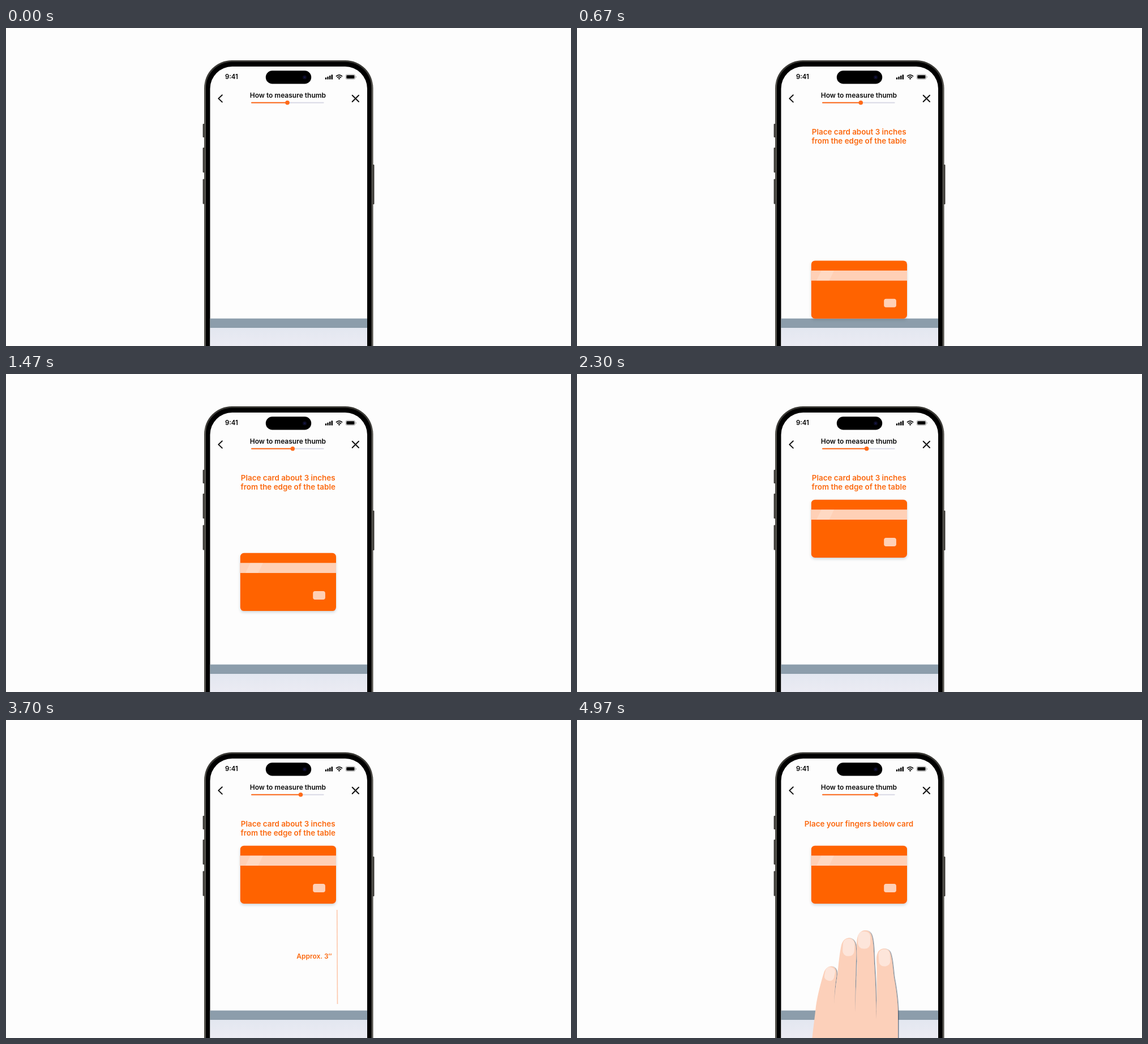
These frames come from a looping animation (998 by 561 pixels, 5 s). An HTML page:

```html
<!DOCTYPE html>
<html lang="en">
<head>
<meta charset="utf-8">
<title>How to measure thumb</title>
<style>
  html, body { margin: 0; width: 100%; height: 100%; overflow: hidden; background: #fdfdfd; }
  svg { display: block; width: 100vw; height: 100vh; }
  text { font-family: Poppins, Inter, sans-serif; font-weight: 600; }
  .accent { fill: #fb6910; text-anchor: middle; font-size: 13.4px; }
</style>
</head>
<body>
<svg viewBox="0 0 998 561">
  <defs>
    <linearGradient id="metal" x1="0" x2="1" y1="0" y2="0">
      <stop offset="0" stop-color="#35342f"/>
      <stop offset=".006" stop-color="#65635d"/>
      <stop offset=".012" stop-color="#3b3a36"/>
      <stop offset=".988" stop-color="#3b3a36"/>
      <stop offset=".994" stop-color="#65635d"/>
      <stop offset="1" stop-color="#35342f"/>
    </linearGradient>
    <linearGradient id="tableSide" x1="0" x2="0" y1="0" y2="1">
      <stop offset="0" stop-color="#e3e7f0"/>
      <stop offset="1" stop-color="#ebebf3"/>
    </linearGradient>
    <clipPath id="screenClip">
      <path d="M360.5 561V107A39 39 0 0 1 399.5 68H599A39 39 0 0 1 638 107V561Z"/>
    </clipPath>
    <filter id="cardShadow" x="-10%" y="-10%" width="120%" height="130%">
      <feDropShadow dx="0" dy="2.5" stdDeviation="2.2" flood-color="#34465a" flood-opacity=".22"/>
    </filter>
    <filter id="handShadow" x="-10%" y="-10%" width="120%" height="120%">
      <feDropShadow dx="1.5" dy=".6" stdDeviation=".6" flood-color="#34465a" flood-opacity=".65"/>
    </filter>
  </defs>

  <rect width="998" height="561" fill="#fdfdfd"/>

  <!-- Phone body -->
  <g fill="#3f3d39">
    <rect x="347.6" y="169" width="4" height="24" rx="1"/>
    <rect x="347.6" y="211" width="4" height="44" rx="1"/>
    <rect x="347.6" y="266.500" width="4" height="44" rx="1"/>
    <rect x="646.500" y="241" width="4" height="70" rx="1"/>
  </g>
  <rect x="350" y="57" width="298.500" height="600" rx="49" fill="url(#metal)"/>
  <rect x="353" y="59.8" width="292.500" height="600" rx="46" fill="#000"/>

  <g clip-path="url(#screenClip)">
    <rect x="360" y="67" width="279" height="494" fill="#fdfdfd"/>
    <rect x="360" y="529" width="279" height="32" fill="url(#tableSide)"/>
    <rect x="360" y="512.500" width="279" height="16.500" fill="#8c9dab"/>

    <g id="placeCard" class="accent">
      <text x="498.2" y="188">Place card about 3 inches</text>
      <text x="498.2" y="203.500">from the edge of the table</text>
    </g>
    <text id="placeFingers" class="accent" x="498" y="188">Place your fingers below card</text>

    <g id="card">
      <g filter="url(#cardShadow)">
        <rect x="413.800" width="169.200" height="102.300" rx="6.500" fill="#ff6400"/>
      </g>
      <rect x="413.800" y="17.500" width="169.200" height="17.800" fill="#ffd0b6"/>
      <path d="M431.500 17.500H454L445.500 35.300H423Z" fill="#fff" opacity=".18"/>
      <rect x="542.200" y="67.300" width="21.700" height="15" rx="3.800" fill="#ffd0b6"/>
    </g>

    <line id="ruler" x1="584.700" y1="335" stroke="#fdc7ab" stroke-width="1.600"/>
    <text id="distance" class="accent" x="544.500" y="421" style="font-size:12px">Approx. 3″</text>

    <g id="hand">
      <path filter="url(#handShadow)" fill="#fcd0ba" d="M414 575C417 545 420 525 422 505C425 485 431 462 436 446
        C440 433 453 431 457 440C460 446 458 455 456.500 465C455 480 454 495 454 508
        C454 490 457 470 460 450C462 430 464 410 467 397C471 382 485 381 490 391
        C495 400 493 420 492.500 440C492 465 491 490 491.500 515
        C492 480 494.500 450 495 425C494.500 410 493 395 495 385C498 368 516 367 520 379
        C524 390 524 410 525 430C527 460 528 490 529 528
        C529 490 530 460 529.500 435C529 425 528 417 531 411C535 401 549 401 553 410
        C557 420 558 440 560 455C564 475 567 500 567 520L567 575Z"/>
      <g id="nails" fill="#fde5da"></g>
    </g>

    <!-- Status bar -->
    <text x="398.400" y="90.200" text-anchor="middle" font-size="11.400">9:41</text>
    <g>
      <rect x="563.800" y="87.300" width="2.400" height="3.400" rx=".7"/>
      <rect x="567.400" y="85.700" width="2.400" height="5" rx=".7"/>
      <rect x="571" y="83.900" width="2.400" height="6.800" rx=".7"/>
      <rect x="574.600" y="82.200" width="2.400" height="8.500" rx=".7"/>
    </g>
    <g fill="none" stroke="#000" stroke-width="1.700">
      <path d="M583 85.300Q588.500 80.400 594 85.300"/>
      <path d="M585 87.600Q588.500 84.600 592 87.600"/>
    </g>
    <path d="M586.500 89Q588.500 87.400 590.500 89L588.500 91Z"/>
    <rect x="600" y="82" width="16.800" height="8.600" rx="2.500" fill="none" stroke="#999" stroke-width=".8"/>
    <rect x="601.300" y="83.300" width="14.200" height="6" rx="1.400"/>
    <rect x="617.700" y="85" width="1" height="2.700" rx=".5" fill="#999"/>
    <rect x="458.800" y="75.300" width="80.400" height="23.200" rx="11.600"/>
    <circle cx="527.500" cy="87" r="3.600" fill="#0b0b20"/>
    <circle cx="527.500" cy="87" r="1.500" fill="#171747"/>

    <!-- Header -->
    <g fill="none" stroke="#111" stroke-width="2" stroke-linecap="round" stroke-linejoin="round">
      <path d="M381.800 118.200L375.300 124.400L381.800 130.600"/>
      <path d="M611.700 118.700L623 130M623 118.700L611.700 130"/>
    </g>
    <text x="497.900" y="122.800" text-anchor="middle" font-size="12" fill="#0b0b0b">How to measure thumb</text>
    <rect x="433" y="130.700" width="128.600" height="2" rx="1" fill="#d9d9e5"/>
    <rect id="progress" x="433" y="130.700" height="2" rx="1" fill="#ff6b1a"/>
    <circle id="knob" cy="131.700" r="3.800" fill="#ff6b1a"/>
  </g>
</svg>
<script>
  const LOOP = 5000;
  const el = id => document.getElementById(id);
  const set = (id, attrs) => {
    for (const [name, value] of Object.entries(attrs)) el(id).setAttribute(name, value);
  };
  const ramp = (t, from, to) => Math.min(1, Math.max(0, (t - from) / (to - from)));
  const smooth = x => x * x * (3 - 2 * x);
  const easeOut = x => 1 - (1 - x) ** 3;

  // Each nail: centre x, top, width, height, tilt
  const nails = [
    [446.5, 436, 17.5, 24, 12],
    [479.8, 386, 20.5, 30.5, 3],
    [507.2, 373, 22, 30.5, 0],
    [543, 404.500, 20, 30, -4]
  ];
  el('nails').innerHTML = nails.map(([x, y, w, h, tilt]) =>
    `<rect x="${x - w / 2}" y="${y}" width="${w}" height="${h}" rx="${w * 0.44}"
      transform="rotate(${tilt} ${x} ${y + h / 2})"/>`).join('');

  function draw(t) {
    const knobX = 497 + t * 0.00634;
    set('progress', { width: knobX - 433 });
    set('knob', { cx: knobX });

    set('placeCard', { opacity: smooth(ramp(t, 60, 330)) * (1 - ramp(t, 3800, 4020)) });
    set('placeFingers', { opacity: ramp(t, 4000, 4220) });

    const lift = smooth(ramp(t, 1000, 1940));
    set('card', {
      opacity: smooth(ramp(t, 180, 570)),
      transform: `translate(0 ${410.4 - 188.7 * lift})`
    });

    const reach = smooth(ramp(t, 2320, 2680));
    const guideFade = 1 - ramp(t, 3800, 4020);
    set('ruler', {
      x2: 584.7 + 0.8 * reach,
      y2: 335 + 166 * reach,
      opacity: reach ? guideFade : 0
    });
    set('distance', { opacity: ramp(t, 3000, 3400) * guideFade });

    const rise = easeOut(ramp(t, 4270, 4840));
    set('hand', {
      transform: `translate(0 ${200 * (1 - rise)})`,
      visibility: rise ? 'visible' : 'hidden'
    });
  }

  const start = performance.now();
  function frame(now) {
    draw(Math.max(0, now - start) % LOOP);
    requestAnimationFrame(frame);
  }
  draw(0);
  requestAnimationFrame(frame);
</script>
</body>
</html>
```
